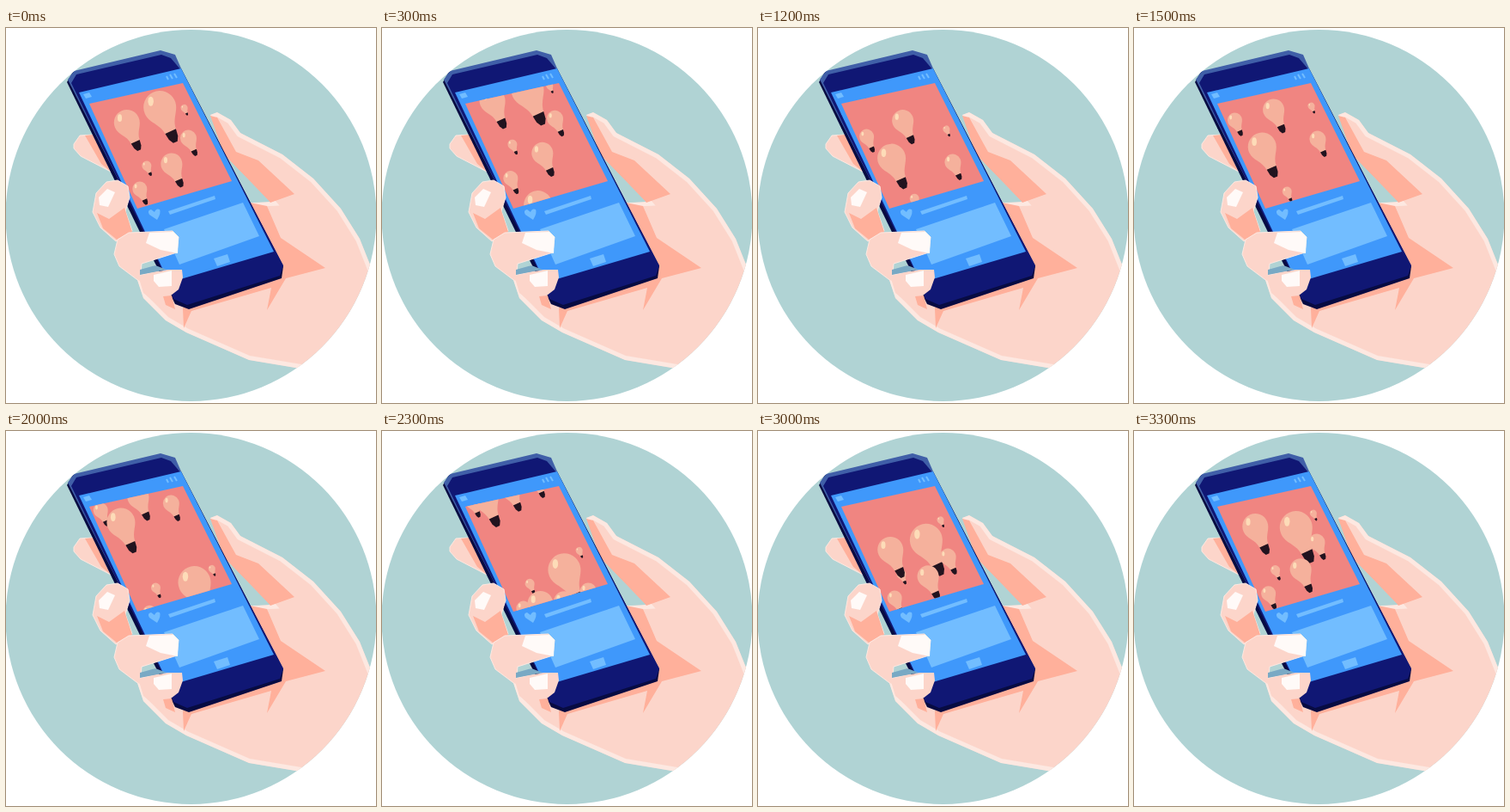
Recreate the animation shown at these times as an HTML page. Size 431 by 436 pixels, loop 3.4 s.

```html
<!DOCTYPE html>
<html lang="en">
<head>
<meta charset="utf-8">
<title>Phone with floating bulbs</title>
<style>
html, body { margin: 0; width: 100%; height: 100%; overflow: hidden; background: #fff }
svg { display: block; width: 100vw; height: 100vh }
.skin { fill: #fcd5ca; stroke: #fde8e1 }
.shade { fill: #ffb09b }
.nail { fill: #fffaf8 }
.teal { fill: #b0d3d4 }
.navy { fill: #101774 }
.dark { fill: #070b42 }
.edge { fill: #405fa8 }
.pale { fill: #72bdff }
</style>
</head>
<body>
<svg viewBox="0 0 431 436">
  <defs>
    <clipPath id="disc"><circle cx="215.5" cy="218" r="216"/></clipPath>
    <clipPath id="photo"><path d="M97 88 206 64 263 178 153 210Z"/></clipPath>
    <path id="palm" d="M238 101 246 98 262 107 273 122 322 147 358 175 390 210 412 245 440 315V420L343 396 283 386 210 354 186 340 160 314 152 290 285 203 308 202 262 150Z"/>
    <clipPath id="hand"><use href="#palm"/></clipPath>
    <g id="bulb">
      <path fill="#f5b19c" d="M-1 0A1 1 0 0 1 1 0C1 .65 .42 .9 .36 1.65H-.36C-.42 .9-1 .65-1 0Z"/>
      <ellipse fill="#fddcb8" cx="-.36" cy="-.55" rx=".17" ry=".29" transform="rotate(24 -.36 -.55)"/>
      <path fill="#22131f" d="M-.36 1.62H.36L.3 2.06 .14 2.35H-.14L-.3 2.06Z"/>
    </g>
  </defs>
  <g clip-path="url(#disc)">
    <circle class="teal" cx="215.5" cy="218" r="217"/>

    <!-- index fingertip and palm -->
    <path class="skin" d="M79 135 86 125 102 124 122 167 87 149 79 140Z"/>
    <path class="shade" d="M92 125 102 124 121 166 111 158Z"/>
    <use href="#palm" class="skin" stroke-width="10" clip-path="url(#hand)"/>
    <path class="shade" d="M238 102 246 104 268 144 294 154 336 193 308 203 254 147Z"/>
    <path class="teal" d="M256 150 284 178 307 202 285 203Z"/>
    <path class="shade" d="M284 203 304 207 320 244 372 279 326 291 304 328 309 302 216 329 207 349 206 326Z"/>

    <!-- phone -->
    <path class="dark" d="M71 63 78 51 204 47 323 277 321 291 213 327 197 321 191 309Z"/>
    <path class="edge" d="M72 60 79 50 180 26 197 31 204 47 188 290Z"/>
    <path class="navy" d="M76 64 82 54 181 31 192 35 204 49 323 276 319 288 211 322 195 315 187 292Z"/>
    <path fill="#3f98fb" d="M85 75 204 47 312 260 190 296Z"/>
    <path class="pale" d="M90 77 97 75 100 80 93 82Z"/>
    <path stroke="#72bdff" stroke-width="2" d="M187 56 189 60M191 54 194 59M196 53 199 58"/>
    <path class="pale" d="M176 223 167 217Q164 212 169 211L173 214Q175 209 179 211Q181 215 176 223ZM189 213 243 195 244 199 191 217ZM184 234 276 203 295 242 202 275ZM242 268 258 263 261 272 246 277Z"/>
    <g clip-path="url(#photo)">
      <path fill="#f08581" d="M90 60H270V215H90Z"/>
      <g id="bulbs"></g>
    </g>

    <!-- gripping fingers -->
    <path class="skin" d="M105 192 117 179 130 177 142 184 144 197 139 213 147 236 128 248 110 232 101 214Z"/>
    <path class="shade" d="M106 215 120 222 138 209 147 237 129 246 113 233Z"/>
    <path class="nail" d="M108 197 118 187 127 191 119 208 109 206Z"/>
    <path class="skin" d="M126 263 130 246 143 238 194 236 201 243 199 261 158 274 156 295 132 277Z"/>
    <path class="nail" d="M167 238 195 237 201 243 200 262 180 258 163 250Z"/>
    <path fill="#79a9c4" d="M156 281 174 276 187 281 156 287Z"/>
    <path fill="#fcd5ca" d="M154 288 188 281 205 281 206 290 201 304 192 311 195 323 182 326 160 308Z"/>
    <path class="shade" d="M183 312 193 311 197 327 186 322Z"/>
    <path class="nail" d="M172 287 193 282V300L178 301 172 294Z"/>
  </g>
</svg>
<script>
const STEP = 100, LOOP = 34, DRIFT = .48;
const layer = document.getElementById("bulbs"), copies = [];

// Bulb of radius r, at x when 100 high; keys are step/height pairs.
// The second copy finishes the flight begun in the previous loop.
function bulb(r, x, ...keys) {
  for (const lag of [0, LOOP]) {
    const node = document.createElementNS("http://www.w3.org/2000/svg", "use");
    node.setAttribute("href", "#bulb");
    layer.append(node);
    copies.push({ r, x, keys, lag, node });
  }
}

bulb(19, 183, 15, 210, 20, 176, 33, 112, 34, 92, 42, 38);
bulb(5.5, 135, 7, 212, 15, 190, 34, 160, 41, 102, 49, 50);
bulb(8.5, 114, 15, 220, 34, 187, 41, 158, 49, 107, 54, 92, 65, 55);
bulb(15, 136, 20, 228, 33, 111, 34, 110, 44, 25);
bulb(16.5, 131, 0, 230, 7, 173, 15, 138, 20, 106, 27, 35);
bulb(12.5, 165, 20, 215, 27, 177, 34, 158, 49, 95, 67, 30);
bulb(9.5, 199, 20, 203, 33, 129, 34, 128, 46, 37);
bulb(9.5, 200, 4, 199, 12, 156, 27, 21);
bulb(4, 211, 15, 195, 27, 111, 34, 93, 39, 50);
bulb(4, 211, 3, 198, 20, 46);

function heightAt(keys, t) {
  for (let i = 2; i < keys.length; i += 2) {
    const [t0, y0, t1, y1] = keys.slice(i - 2, i + 2);
    if (t >= t0 && t <= t1) return y0 + (y1 - y0) * (t - t0) / (t1 - t0);
  }
  return null;
}

function draw() {
  const t = Math.floor(performance.now() / STEP) % LOOP;
  for (const { r, x, keys, lag, node } of copies) {
    const y = heightAt(keys, t + lag);
    node.style.display = y === null ? "none" : "";
    if (y !== null)
      node.setAttribute("transform", `translate(${x + DRIFT * (y - 100)} ${y}) rotate(-24) scale(${r})`);
  }
  requestAnimationFrame(draw);
}
draw();
</script>
</body>
</html>
```
